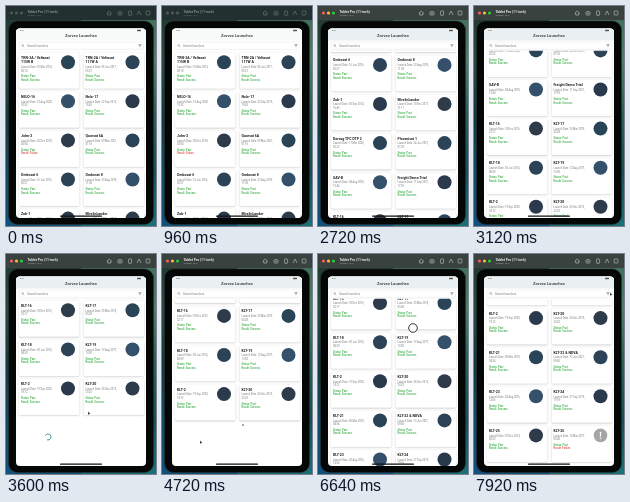
An HTML page with a canvas for the animation above (8 s loop, 150 by 220 pixels).

```html
<!DOCTYPE html>
<html lang="en">
<head>
<meta charset="utf-8">
<title>Launch list</title>
<style>
html, body { margin: 0; width: 100%; height: 100%; overflow: hidden; background: #163f46; }
canvas { display: block; width: 150px; height: 220px; }
</style>
</head>
<body>
<canvas id="stage"></canvas>
<script>
const canvas = document.getElementById('stage');
const ctx = canvas.getContext('2d');
const ratio = window.devicePixelRatio || 1;
canvas.width = 150 * ratio;
canvas.height = 220 * ratio;

const LOOP = 8000, STEP = 80, PITCH = 39.1, FIRST_ROW = 51.7;
const FONT = 'Roboto, "Open Sans", sans-serif';
const GREEN = '#36ad43', RED = '#e34a43';

const rows = [
  ['TRN-3A / Veltasat|115W B', 'TRN-2A / Veltasat|117W A'],
  ['NELO-16', 'Nelo-17'],
  ['Jolm-2', 'Quorsat 6A'],
  ['Ombosat 6', 'Ombosat 8'],
  ['Zub-1', 'MirelinLander'],
  ['Dorvag TFC OTP 2', 'Plovenisat 1'],
  ['SAV-B', 'Freight Demo Trial'],
  ['KLT-16', 'KLT-17'],
  ['KLT-18', 'KLT-19'],
  ['KLT-2', 'KLT-20'],
  ['KLT-21', 'KLT-22 & NOVA'],
  ['KLT-23', 'KLT-24'],
  ['KLT-25', 'KLT-26']
];
const failed = ['Jolm-2', 'KLT-26'];
const withoutPicture = 'KLT-26';
const tones = ['#2a4457', '#2c4256', '#35506a', '#2a3a4c', '#2d3b4b'];
const months = ['Mar', 'Jun', 'Aug', 'Sep', 'Dec'];

// Each stop is [time, value, ...]; values ease between neighbours.
const scrollStops = [[0, 0], [2000, 0], [2720, 114.6], [3440, 273.6], [3600, 273.6],
  [4320, 268], [6560, 268], [6640, 280.8], [7440, 344], [8000, 344]];
const pointerStops = [[1760, 74, 126.5], [2240, 74, 126.5], [3600, 83, 159],
  [4720, 39, 188], [5600, 70, 125], [6560, 95, 74], [6720, 95, 74], [7920, 137, 40], [8000, 137, 40]];

function sample(stops, time) {
  let i = 1;
  while (i < stops.length - 1 && time > stops[i][0]) i++;
  const a = stops[i - 1], b = stops[i];
  const p = Math.min(1, Math.max(0, (time - a[0]) / (b[0] - a[0])));
  const eased = p * p * (3 - 2 * p);
  return a.slice(1).map((v, k) => v + (b[k + 1] - v) * eased);
}

function box(x, y, w, h, r, fill, stroke, line = 0.4) {
  ctx.beginPath();
  ctx.roundRect(x, y, w, h, r);
  if (fill) { ctx.fillStyle = fill; ctx.fill(); }
  if (stroke) { ctx.strokeStyle = stroke; ctx.lineWidth = line; ctx.stroke(); }
}

function disc(x, y, r, fill) {
  ctx.beginPath();
  ctx.arc(x, y, r, 0, 7);
  ctx.fillStyle = fill;
  ctx.fill();
}

function path(points, color, line = 0.6) {
  ctx.beginPath();
  points.forEach(([x, y], i) => i ? ctx.lineTo(x, y) : ctx.moveTo(x, y));
  ctx.strokeStyle = color;
  ctx.lineWidth = line;
  ctx.stroke();
}

function arc(x, y, r, from, to, color, line) {
  ctx.beginPath();
  ctx.arc(x, y, r, from, to);
  ctx.strokeStyle = color;
  ctx.lineWidth = line;
  ctx.stroke();
}

function text(str, x, y, size, color, weight = 400, align = 'left') {
  ctx.font = `${weight} ${size}px ${FONT}`;
  ctx.textAlign = align;
  ctx.textBaseline = 'middle';
  ctx.fillStyle = color;
  ctx.fillText(str, x, y);
}

function wallpaper(x, colors) {
  const fill = ctx.createLinearGradient(0, 0, 0, 220);
  colors.forEach((c, i) => fill.addColorStop(i / (colors.length - 1), c));
  ctx.fillStyle = fill;
  ctx.fillRect(x, 0, 75, 220);
}

function drawWindow(active) {
  wallpaper(0, ['#20372f', '#28493f', '#123a40', '#124a68', '#13507c']);
  wallpaper(75, ['#3d6b58', '#4a8068', '#256058', '#155058', '#1c7078']);
  box(0, 0, 150, 14, 0, active ? '#39423f' : '#22302f');
  const lights = active ? ['#fb5f57', '#fcbb2f', '#2ac840'] : ['#4b5a58', '#4b5a58', '#4b5a58'];
  lights.forEach((c, i) => disc(5.5 + i * 5, 7, 1.6, c));
  text('Tablet Pro (11-inch)', 21.5, 5.6, 3.4, active ? '#f0f2f2' : '#849493', 700);
  text('System 15.2', 21.5, 9.4, 2.5, active ? '#a9b1b3' : '#6f807f');
  drawTools(active ? '#c2c9ca' : '#71817f');

  box(2.5, 15, 145, 203.5, 9, '#050707', '#2c3433', 0.5);
  box(10, 22.5, 130, 189.5, 4, '#fff');
}

function drawTools(color) {
  path([[101, 7], [103.2, 5], [105.4, 7], [104.8, 7], [104.8, 9], [101.7, 9], [101.7, 7], [101, 7]], color);
  box(112, 5.7, 4, 3.3, 0.6, null, color, 0.6);
  disc(114, 7.3, 0.7, color);
  box(122.6, 5, 3, 4.3, 0.5, null, color, 0.6);
  path([[131, 9], [133, 5], [135, 9]], color);
  box(140.2, 5, 3.7, 4, 0.5, null, color, 0.6);
}

function drawPicture(x, y, name, index) {
  if (name !== withoutPicture) {
    disc(x, y, 7, tones[index % tones.length]);
    return;
  }
  disc(x, y, 6.8, '#a5a5a5');
  box(x - 0.6, y - 3.6, 1.2, 4.6, 0.5, '#fff');
  disc(x, y + 2.8, 0.8, '#fff');
}

function drawCard(x, y, name, index) {
  ctx.save();
  ctx.shadowColor = 'rgba(0,0,0,.22)';
  ctx.shadowBlur = 1.6 * ratio;
  ctx.shadowOffsetY = 0.6 * ratio;
  box(x, y - 5, 60.5, 36, 1.5, '#fff');
  ctx.restore();

  const lines = name.split('|');
  lines.forEach((line, i) => text(line, x + 2, y + i * 4, 3.5, '#18191b', 700));
  const shift = (lines.length - 1) * 4.5;
  const day = String(index * 7 % 27 + 1).padStart(2, '0');
  const hour = String(index * 5 % 24).padStart(2, '0');
  text(`Launch Date: ${day} ${months[index % 5]} ${2014 + index * 3 % 8},`, x + 2, y + 5 + shift, 2.65, '#777b7e');
  text(`${hour}:${10 + index * 11 % 49}`, x + 2, y + 8.6 + shift, 2.65, '#777b7e');

  const failure = failed.includes(name);
  text('Status: Past', x + 2, y + 14.2 + shift, 2.65, GREEN, 500);
  text(failure ? 'Result: Failure' : 'Result: Success', x + 2, y + 17.8 + shift, 2.65,
    failure ? RED : GREEN, 500);
  drawPicture(x + 49, y + 4.5, name, index);
}

function drawList(time, scroll) {
  ctx.save();
  ctx.beginPath();
  ctx.roundRect(10, 44.5, 130, 167.5, [0, 0, 4, 4]);
  ctx.clip();
  const count = time < 5200 ? 10 : rows.length;
  rows.slice(0, count).forEach((pair, r) => {
    const y = FIRST_ROW + r * PITCH - scroll;
    if (y < 8 || y > 218) return;
    pair.forEach((name, c) => drawCard(13 + c * 64.5, y, name, r * 2 + c));
  });
  if (time > 3000 && time < 4400) {
    const turn = time / 160;
    arc(42, 456.6 - scroll, 3, turn, turn + 4.5, '#289181', 0.9);
  }
  ctx.restore();
  box(54, 209.6, 42, 1.1, 0.55, '#111');
}

function drawHeader(active) {
  box(10, 22.5, 130, 22, [4, 4, 0, 0], '#fff');
  box(10, 22.5, 130, 12, [4, 4, 0, 0], active ? '#eaf0f2' : '#f8f9f9');
  text('9:41', 14, 24.5, 2, '#333', 500);
  box(131, 23.8, 4, 1.4, 0.4, '#555');
  text('Zorvex Launches', 75, 30, 4.2, '#2b3033', 500, 'center');
  box(13, 36.2, 124.5, 7.2, 1.5, '#fff', '#dce1e3', 0.4);
  arc(16.6, 39.4, 0.9, 0, 7, '#62686b', 0.4);
  path([[17.3, 40.1], [18.2, 41]], '#62686b', 0.4);
  text('Search launches', 21, 39.8, 2.9, '#777d80');
  [3.2, 2, 0.8].forEach((w, i) => path([[134 - w / 2, 38.7 + i], [134 + w / 2, 38.7 + i]], '#4d5457', 0.5));
}

function drawPointer(time) {
  if (time < 1760 || (time > 2080 && time < 3200)) return;
  const [x, y] = sample(pointerStops, time);
  const pressed = Math.abs(time - 1920) < 100 || Math.abs(time - 6640) < 100;
  if (pressed) {
    disc(x, y, 4.3, 'rgba(255,255,255,.7)');
    arc(x, y, 4.3, 0, 7, '#202526', 0.9);
    return;
  }
  ctx.beginPath();
  ctx.moveTo(x - 1, y - 1.5);
  ctx.lineTo(x - 1, y + 1.8);
  ctx.lineTo(x + 1.3, y + 0.8);
  ctx.closePath();
  ctx.fillStyle = '#111';
  ctx.fill();
  ctx.strokeStyle = '#fff';
  ctx.lineWidth = 0.3;
  ctx.stroke();
}

function draw(now) {
  const time = Math.floor(now % LOOP / STEP) * STEP;
  const active = time > 2000;
  const [scroll] = sample(scrollStops, time);
  ctx.setTransform(ratio, 0, 0, ratio, 0, 0);
  drawWindow(active);
  drawList(time, scroll);
  drawHeader(active);
  if (time > 4400 && time < 5000) disc(81, 171, 0.8, '#333');
  drawPointer(time);
}

const start = performance.now();
function tick() {
  draw(performance.now() - start);
  requestAnimationFrame(tick);
}
tick();
</script>
</body>
</html>
```
